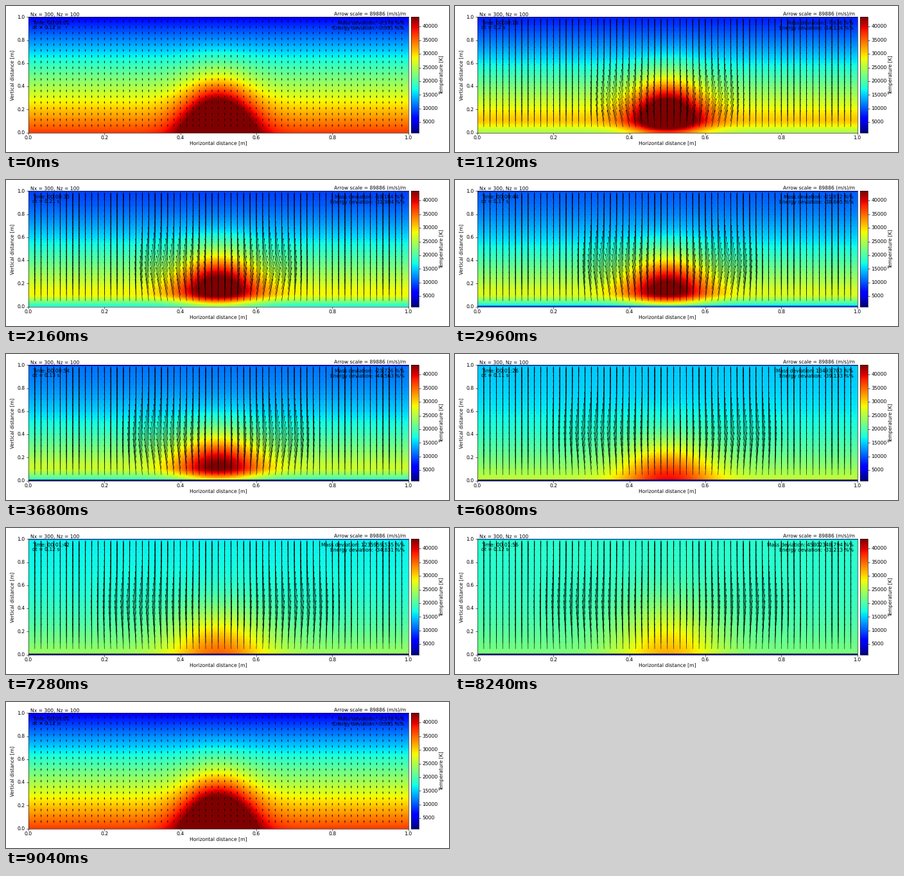
These frames come from a looping animation (690 px wide and 229 px high, 9.12 s). A matplotlib script:

```python
import math

import numpy as np
import matplotlib.pyplot as plt
from matplotlib.animation import FuncAnimation

W, H, DPI = 690, 229, 55
LEFT, RIGHT, TOP, BOTTOM = 35, 626.5, 17.4, 198.7
FRAMES, STEP = 114, 80
NX, NZ = 300, 100
EPS = 1e-6

# Key points of the printed readings
KEYS = [0, 14, 27, 46, 63, 91, 112]
CLOCK = [1, 16, 33, 54, 72, 102, 126]
DT = [.12, .2, .21, .13, .11, .12, .12]
MASS = [-.578, -7.636, -18.169, -25.333, -24.5, -24.5, -24.5]
ENERGY = [-.995, -14.134, -31.984, -44.563, -42.862, -34.831, -28.5]
GROWTH = math.log(1235984.035 / 269.963) / 28

x = (np.arange(NX) + .5) / NX
z = ((np.arange(NZ) + .5) / NZ)[:, None]
grid_x, grid_z = np.meshgrid(np.arange(1, 60) * 5 / NX,
                             np.arange(1, 20) * 5 / NZ)


def temperature(n):
    """Layered gas that mixes while its hot spot lifts, sinks and fades."""
    lift = math.sin(math.pi * min(n / 62, 1))
    frost = min(max((n - 30) / 14, 0), 1)

    top, bottom = 6 + .117 * n, 37 - .14 * n
    layers = top + (bottom - top) * (1 - z) ** (1 + .016 * n)
    layers = layers - 15 * lift * np.exp(-(z / .07) ** 2)
    layers = layers - 4 * frost * (z > .99)

    mid = .03 * min(n / 14, 1) + .13 * lift
    up = .28 + .13 * ((n - 50) / 50) ** 2
    spread = np.where(z > mid, up, .14)
    width = .093 + .0004 * n
    spot = 25 * (1 - n / 165) * np.exp(-((x - .5) / width) ** 2
                                       - ((z - mid) / spread) ** 2)
    return 1000 * (layers + spot) * (1 - .95 * frost * (z < .01))


def flow(n):
    """Arrow components in pixels: a rising stream pushed out of the centre."""
    grow = 1 - math.exp(-n / 14)
    q = (grid_x - .5) / (.15 + .0015 * n)
    push = 22 * grow * math.exp(-n / 90)
    height = (grid_z - .15 - .001 * n) / .22
    u = push * q * np.exp(-q ** 6 - height ** 2)
    v = np.minimum(4.5 + 36 * grow, .8 * (1 - grid_z) * (BOTTOM - TOP))
    return u, v


def reading(values, n):
    return float(np.interp(n, KEYS, values))


def box(x0, x1):
    return [x0 / W, 1 - BOTTOM / H, (x1 - x0) / W, (BOTTOM - TOP) / H]


def label(px, py, text="", ha="left", va="baseline", **style):
    return fig.text(px / W, 1 - py / H, text, ha=ha, va=va, **style)


plt.rcParams.update({"font.family": "DejaVu Sans", "font.size": 10,
                     "text.hinting": "none", "xtick.major.pad": 3})
fig = plt.figure(figsize=((W + EPS) / DPI, (H + EPS) / DPI), dpi=DPI,
                 facecolor="white")
ax = fig.add_axes(box(LEFT, RIGHT))
image = ax.imshow(temperature(0), cmap="jet", vmin=1180, vmax=43450,
                  origin="lower", extent=(0, 1, 0, 1), aspect="auto",
                  interpolation="nearest")
arrows = ax.quiver(grid_x, grid_z, *flow(0), units="dots", width=.6,
                   scale_units="dots", scale=1, pivot="tail")
ax.set(xlim=(0, 1), ylim=(0, 1))
fig.colorbar(image, cax=fig.add_axes(box(631, 643)))

label(330.5, 218, "Horizontal distance [m]", "center")
label(11, 108, "Vertical distance [m]", "center", "center", rotation=90)
label(678.3, 108, "Temperature [K]", "center", "center", rotation=90)
label(38, 16.5, "Nx = 300, Nz = 100")
label(623.5, 14.8, "Arrow scale = 89886 (m/s)/m", "right")
time_text = label(41, 28.5)
dt_text = label(41, 36)
mass_text = label(620.5, 28.5, ha="right")
energy_text = label(620.5, 36, ha="right")


def draw(i):
    n = i % (FRAMES - 1)
    image.set_data(temperature(n))
    arrows.set_UVC(*flow(n))
    s = round(reading(CLOCK, n))
    mass = reading(MASS, n) + 269.963 * math.exp(GROWTH * (n - 63))
    time_text.set_text(f"Time: 00:{s // 60:02d}:{s % 60:02d}")
    dt_text.set_text(f"dt = {round(reading(DT, n), 2)} s")
    mass_text.set_text(f"Mass deviation: {mass:.3f} %%")
    energy_text.set_text(f"Energy deviation: {reading(ENERGY, n):.3f} %%")
    return image, arrows, time_text, dt_text, mass_text, energy_text


anim = FuncAnimation(fig, draw, frames=FRAMES, interval=STEP, repeat=True)
plt.show()
```
